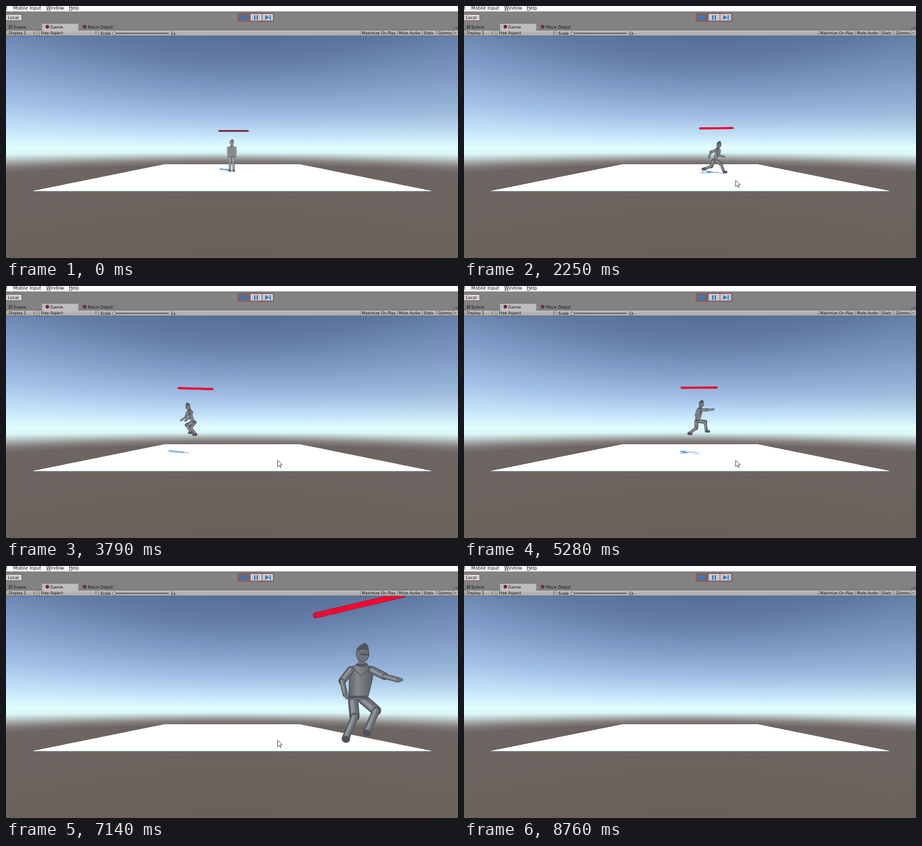
These frames come from a looping animation (1001 px wide and 559 px high, 8.92 s). An HTML page with a canvas:

```html
<!DOCTYPE html>
<html lang="en">
<head>
<meta charset="utf-8">
<title>Game view</title>
<style>
html, body { margin: 0; width: 100%; height: 100%; overflow: hidden; background: #6b615b; }
canvas, svg { position: absolute; left: 0; top: 0; display: block; }
text { font-family: "DejaVu Sans", sans-serif; fill: #111; white-space: pre; }
</style>
</head>
<body>
<canvas id="sky" width="1001" height="559"></canvas>
<svg width="1001" height="559" viewBox="0 0 1001 559">
  <defs>
    <linearGradient id="strip" x2="0" y2="1">
      <stop stop-color="#c0c0c0"/><stop offset="1" stop-color="#a4a4a4"/>
    </linearGradient>
    <linearGradient id="chest">
      <stop stop-color="#5b5e64"/><stop offset=".35" stop-color="#85898e"/><stop offset="1" stop-color="#54575d"/>
    </linearGradient>
    <clipPath id="view"><rect y="67" width="1001" height="492"/></clipPath>
    <clipPath id="floor"><path d="M351 351H651L942 410H60Z"/></clipPath>
  </defs>
  <path d="M351 351H651L942 410H60Z" fill="#fff" shape-rendering="crispEdges"/>
  <path d="M60 410.5H942" stroke="#a9dcdc"/>
  <g clip-path="url(#floor)"><g id="shade"></g></g>
  <g clip-path="url(#view)"><g id="man"></g><g id="bar"></g></g>
  <g id="ui"></g>
  <path id="cursor" d="M0 0V14L3.4 11L6 16.2L8.2 15.2L5.8 10.2H10Z" fill="#fff" stroke="#222"/>
</svg>
<script>
const $ = id => document.getElementById(id);
const LOOP = 8920, STEP = 77.7, HORIZON = 322;
const clamp = v => Math.max(0, Math.min(1, v));
const mix = (p, q, u) => p.map((v, i) => v + (q[i] - v) * u);

// Colour follows elevation, so the sky stretches towards the sides.
function paintSky() {
  const c = $('sky').getContext('2d'), mid = 316, up = 260, down = 243;
  const stops = [[-up, '#546d93'], [-186, '#657eaa'], [-116, '#86a2cd'], [-66, '#a4c3e8'],
    [-28, '#c5e4f9'], [-2, '#e0fdff'], [9, '#d9f5f5'], [27, '#84807e'], [36, '#6c6561'], [down, '#6a605a']];
  for (let x = 0; x < 1001; x++) {
    const s = Math.hypot(1, (x - 500) / 442);
    const g = c.createLinearGradient(0, mid - up * s, 0, mid + down * s);
    for (const [d, col] of stops) g.addColorStop((d + up) / (up + down), col);
    c.fillStyle = g;
    c.fillRect(x, 66, 1, 493);
    const dim = c.createLinearGradient(0, 66, 0, mid);
    dim.addColorStop(0.7, `rgba(40,70,105,${clamp((x - 500) / 500) * 0.14})`);
    dim.addColorStop(1, 'rgba(40,70,105,0)');
    c.fillStyle = dim;
    c.fillRect(x, 66, 1, mid - 66);
  }
}

function buildUi() {
  const box = (x, y, w, h, fill, more = '') =>
    `<rect x="${x}" y="${y}" width="${w}" height="${h}" fill="${fill}" ${more}/>`;
  const label = (x, y, s, size = 8.4) => `<text x="${x}" y="${y}" font-size="${size}">${s}</text>`;
  const path = (d, stroke, fill = 'none', w = 1) =>
    `<path d="${d}" stroke="${stroke}" fill="${fill}" stroke-width="${w}"/>`;
  const arrows = x => path(`M${x} 58.5l2-2.5 2 2.5zM${x} 60.5l2 2.5 2-2.5z`, 'none', '#8a3a42');
  const rule = x => path(`M${x}.5 54V66`, '#777');
  const red = '#7c2f39', blue = '#2678e4';
  $('ui').innerHTML =
    box(0, 0, 1001, 12, '#fcfcfc') + box(0, 12, 1001, 41, '#828282') +
    label(-7, 8, 'nt', 10) + label(16, 8, 'Mobile Input', 10) +
    label(89, 8, 'Window', 10) + label(139, 8, 'Help', 10) +
    path('M89 9.5H99M139 9.5H147', '#222') +
    box(-8, 18.5, 43, 14, '#d3d3d3', `rx="2" stroke="${red}"`) + label(4, 29, 'Local', 9.3) +
    box(514.5, 16.5, 78, 17, '#c9c9c9', `rx="2" stroke="${red}" stroke-width="1.4"`) +
    box(515.5, 17.5, 25, 15, '#6b676b') + path('M541 17V33M567 17V33', red) +
    path('M521 20L535 25.5L521 31ZM574 20L583 25.5L574 31Z', 'none', blue) +
    path('M551 20.5V31M556.5 20.5V31', blue, 'none', 3) + path('M585 20V31', blue, 'none', 2.4) +
    box(80, 39.5, 80, 14, '#bdbdbd', 'rx="1"') +
    path('M8 42V51M12 42V51M5 44.5H14M5 48.5H14', '#333', 'none', 1.2) +
    label(16, 50, 'Scene', 9.5) + label(98, 50, 'Game', 9.5) + label(181, 50, 'Piece Depot', 9.3) +
    '<circle cx="91.5" cy="46" r="4" fill="#75232f"/>' + box(170, 42, 8, 8, '#75333c') +
    path('M990 47.5h4l-2 2.5z', 'none', red) + path('M995 47.5h6M995 49.5h6', red) +
    box(0, 53, 1001, 14, 'url(#strip)') + path('M0 53.5H80M160 53.5H1001', '#5d5d5d') +
    path('M0 66.5H1001', '#55585e') +
    [1, 68, 73, 204, 784, 866, 921, 952, 990].map(rule).join('') +
    label(6, 63, 'Display 1') + label(77.5, 63, 'Free Aspect') + label(209, 63.5, 'Scale') +
    arrows(60) + arrows(197) + path('M240 60.5H360', '#555', 'none', 2) +
    '<circle cx="240" cy="61" r="3.6" fill="#c8c8c8" stroke="#555"/>' +
    label(365, 64, '1x') + label(788, 63, 'Maximize On Play') + label(870, 63, 'Mute Audio') +
    label(925, 63, 'Stats') + label(956.5, 63, 'Gizmos') +
    path('M993 58.5h4l-2 2.5z', 'none', '#444');
}

// Poses: angles in degrees from straight down, forward positive.
// A limb is [upper, lower], a leg adds its reach, 1 when not foreshortened.
const pose = (hip, lean, armA, armB, legA, legB) => [hip, lean, ...armA, ...armB, ...legA, ...legB];
const STAND = pose(73, 0, [-2, 0], [2, 0], [-2, -1, 1], [2, 1, 1]);
const RUN = pose(62, 14, [-70, -20], [-8, 75], [-22, -72, 1], [59, 21, 1]);
const TUCK = pose(62, 18, [20, 50], [20, 55], [41, -38, 1], [67, -33, 1]);
const LEAP = pose(68, 11, [-16, 0], [94, 92], [-2, -53, 1], [84, 7, 1]);
const JOG = pose(65, 0, [-12, 0], [12, 10], [2, -10, 0.55], [6, 6, 1]);
const FALL = pose(69, 6, [-37, 13], [63, 75], [5, -22, 1], [49, -23, 1]);

const swap = ([hip, lean, a, b, c, d, e, f, g, h, i, j]) => [hip, lean, c, d, a, b, h, i, j, e, f, g];
const mirror = p => swap(p).map((v, i) => [0, 8, 11].includes(i) ? v : -v);
const stride = (p, q, t) => mix(p, q, 0.5 - 0.5 * Math.cos(t / 95));

// Turning points: time, screen x, pixels per world unit.
const TURNS = [[460, 500, 45], [1280, 285, 49], [2800, 709, 51.5], [4360, 252, 53.5], [5700, 639, 55], [6210, 611, 60]];
const FRONT = 6050, EDGE = 6569;
const JUMPS = [1150, 2330, 3742, 5220], AIR = 1000;

function place(t) {
  const s = (t - 6210) / 1000;
  if (s > 0) {
    const k = 427 / Math.max(2.2, 7.12 - 4.38 * s);
    return { x: 500 + (1.85 + 0.145 * s) * k, k, dir: 1 };
  }
  const i = Math.max(1, TURNS.findIndex(p => p[0] > t)), a = TURNS[i - 1], b = TURNS[i];
  const [, x, k] = mix(a, b, clamp((t - a[0]) / (b[0] - a[0])));
  return { x, k, dir: t < 460 || t >= FRONT ? 1 : Math.sign(b[1] - a[1]) };
}

function state(t) {
  const at = place(t), still = t < 460, front = t >= FRONT;
  let h = 0, p = still ? STAND : front ? stride(JOG, mirror(JOG), t - 6210) : stride(RUN, swap(RUN), t - 2250);
  const start = JUMPS.find(s => t > s && t < s + AIR);
  if (start) {
    const u = (t - start) / AIR, off = at.dir > 0 ? LEAP : TUCK;
    h = 14 * u * (1 - u);
    p = mix(mix(off, TUCK, clamp((u - 0.2) * 3)), p, clamp((u - 0.85) / 0.15));
  }
  if (t > EDGE) {
    h = 1.15 - 10.5 * ((t - 6900) / 1000) ** 2;
    p = mix(p, FALL, clamp((t - EDGE) / 300));
  }
  return { ...at, h, p, still, front };
}

// Draws the body with its feet at 0,0; 100 units are one world unit.
function figure([hip, lean, ...limbs], wide, face, light, flat) {
  const [dark, mid, hi] = flat ? [flat, flat, flat] :
    light ? ['#626466', '#8b8d8f', '#a8aaaa'] : ['#505359', '#6e7278', '#8f9398'];
  const to = ([x, y], deg, len) => {
    const a = deg * Math.PI / 180;
    return [x + Math.sin(a) * len, y + Math.cos(a) * len];
  };
  const line = (a, b, w, col) =>
    `<path d="M${a}L${b}" stroke="${col}" stroke-width="${w}" stroke-linecap="round"/>`;
  const bone = (a, b, w) => line(a, b, w, dark) + line(a, b, w * 0.75, mid) +
    line([a[0] - w * 0.12, a[1]], [b[0] - w * 0.12, b[1]], w * 0.35, hi);

  const w = wide ? 20 : 10, hx = 0, hy = -hip;
  const neck = to([hx, hy], 180 - lean, 54), [nx, ny] = neck;
  const head = to(neck, 180 - lean * 1.3 - (wide ? 0 : 8), 15), [cx, cy] = head;
  const arm = (side, [up, low]) => {
    const s = [nx + side * w * 0.85, ny + 11], e = to(s, up, 22), m = to(e, low, 22);
    return bone(s, e, 12) + bone(e, m, 8.5) + line(m, to(m, low + 15, 5), 6, mid);
  };
  const leg = (side, [up, low, reach]) => {
    const s = [hx + side * w * 0.38, hy + 3], n = to(s, up, 28 * reach), f = to(n, low, 38 * reach);
    return bone(s, n, 16) + bone(n, f, 12) + line(f, [f[0] + (wide ? 2 : 10), f[1] + 1], 10, dark);
  };
  const torso = `<path d="M${nx - w} ${ny + 9}Q${nx} ${ny - 5} ${nx + w} ${ny + 9}` +
    `Q${nx + w * 0.9} ${ny + 26} ${hx + w * 0.75} ${hy + 4}H${hx - w * 0.75}` +
    `Q${nx - w * 0.9} ${ny + 26} ${nx - w} ${ny + 9}Z" fill="${flat || light ? mid : 'url(#chest)'}" stroke="${dark}"/>`;
  const gear = flat ? '' :
    `<path d="M${hx - w * 0.75} ${hy}H${hx + w * 0.75}" stroke="${dark}" stroke-width="4"/>` +
    `<path d="M${nx - w * 0.6} ${ny + 10}L${nx} ${ny + 20}L${nx + w * 0.6} ${ny + 10}" stroke="${dark}" fill="none"/>` +
    `<path d="M${nx - 8} ${ny + 2}Q${nx} ${ny + 7} ${nx + 9} ${ny + 1}" stroke="${dark}" stroke-width="4" fill="none"/>`;
  const top = `<ellipse cx="${cx}" cy="${cy}" rx="10" ry="13" fill="${mid}" stroke="${dark}"/>` +
    `<path d="M${cx - 10} ${cy - 3}Q${cx - 8} ${cy - 12} ${cx + 3} ${cy - 17}Q${cx + 11} ${cy - 13} ${cx + 9} ${cy - 4}Q${cx} ${cy - 9} ${cx - 10} ${cy - 3}Z" fill="${dark}"/>` +
    (face ? `<path d="M${cx - 3} ${cy + 1}H${cx + 10}" stroke="#3d4046" stroke-width="3"/>` +
      `<path d="M${cx - 2} ${cy + 0.5}H${cx + 9}" stroke="${hi}" stroke-width=".8"/>` : '');
  const far = arm(-1, limbs.slice(0, 2));
  return (wide ? '' : far) + leg(-1, limbs.slice(4, 7)) + leg(1, limbs.slice(7)) +
    line(neck, head, 11, mid) + torso + gear + (wide ? far : '') + arm(1, limbs.slice(2, 4)) + top;
}

function drawCursor(t) {
  const enter = (1 - clamp((t - 460) / 770)) ** 2, leave = clamp((t - 7500) / 650) ** 1.3;
  $('cursor').style.display = t >= 460 && t < 8150 ? '' : 'none';
  $('cursor').setAttribute('transform',
    `translate(${601.5 + 378 * enter + 398 * leave},${386.5 + 94 * enter + 173 * leave})`);
}

function put(id, body, transform) {
  $(id).innerHTML = body;
  $(id).setAttribute('transform', transform);
}

function draw(t) {
  drawCursor(t);
  $('man').style.display = $('bar').style.display = t < 7830 ? '' : 'none';
  const { x, k, dir, h, p, still, front } = state(t);
  const wide = front || still, ground = HORIZON + k, y = ground - h * k, s = k / 100;
  put('man', figure(p, wide, front, still), `translate(${x},${y}) scale(${s * dir},${s})`);
  put('shade', t < 6950 ? figure(p, wide, false, false, '#6c9cd6') : '',
    `matrix(${s * dir},0,${s * 0.36},${s * 0.08},${x - 0.36 * h * k},${ground - 1 - 0.08 * h * k})`);

  const bx = x + 4, by = y - k * (1.93 + 0.0015 * k), half = k * 0.71;
  const tilt = -(bx - 500) * (HORIZON - by) * 2e-4;
  const bar = (w, col) =>
    `<path d="M${-half} 0H${half}" stroke="${col}" stroke-width="${w * k}" stroke-linecap="round"/>`;
  put('bar', still ? bar(0.085, '#6b2430') + bar(0.05, '#842534') : bar(0.09, '#8e1029') + bar(0.078, '#fb0530'),
    `translate(${bx},${by}) rotate(${tilt})`);
}

// The picture advances in steps, like a screen recording.
const hold = t => t < 460 ? 0 : 460 + Math.floor((t - 440) / STEP) * STEP;
let last = -1;
function tick(now) {
  const t = hold(now % LOOP);
  if (t !== last) draw(last = t);
  requestAnimationFrame(tick);
}

paintSky();
buildUi();
draw(0);
requestAnimationFrame(tick);
</script>
</body>
</html>
```
